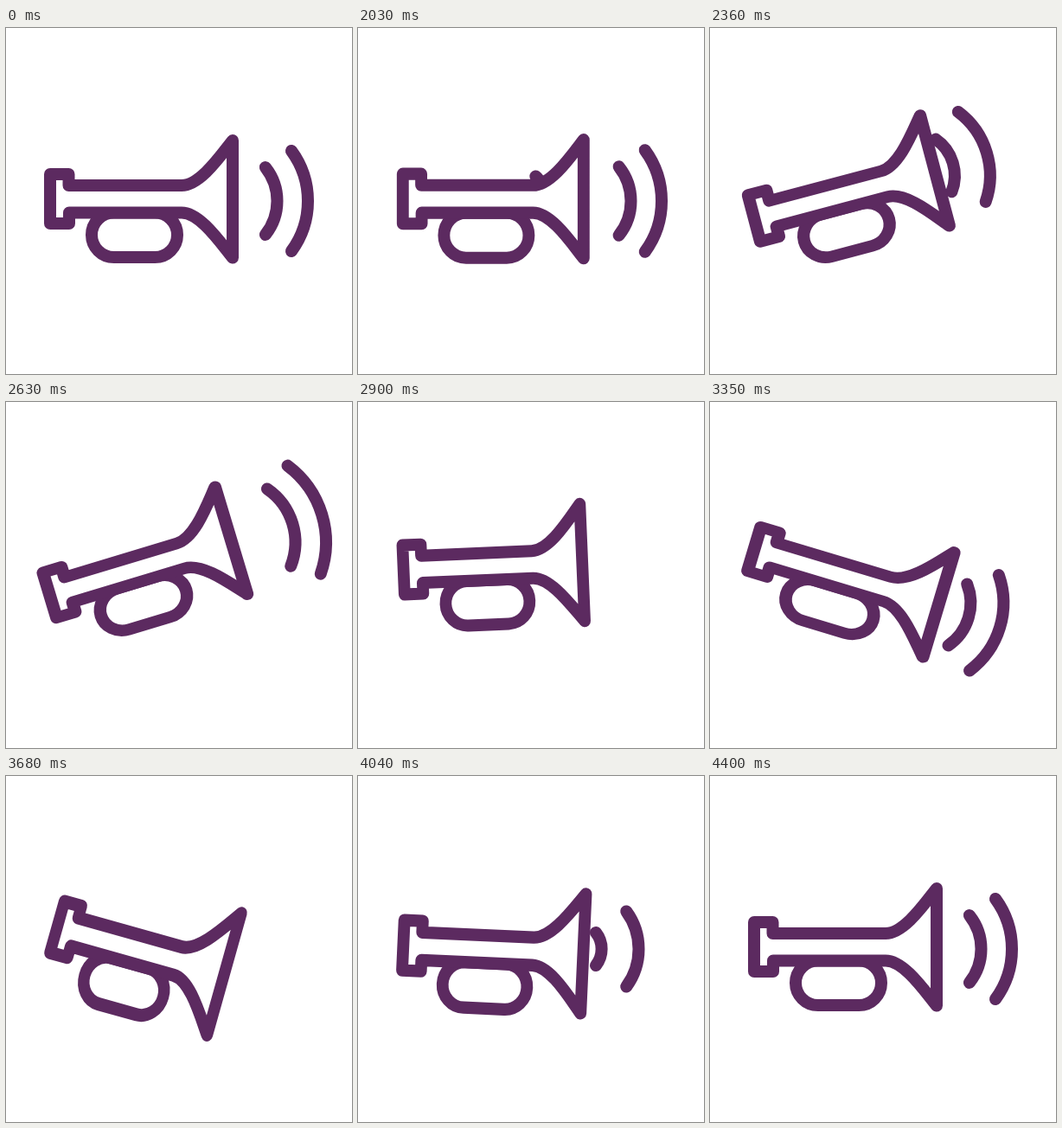
An HTML page that plays this animation: 400x400 px, repeating every 4460 ms.

```html
<!DOCTYPE html>
<html lang="en">
<head>
<meta charset="utf-8">
<title>Bugle</title>
<style>
  html, body { margin: 0; width: 100%; height: 100%; overflow: hidden; background: #fff; }
  svg { display: block; width: 100vw; height: 100vh; }
  path, rect { fill: none; stroke: #5c2a60; stroke-width: 14; stroke-linecap: round; stroke-linejoin: round; }
  .solid { fill: #fff; }
</style>
</head>
<body>
<svg viewBox="0 0 400 400">
  <g id="waves"></g>
  <g id="bugle">
    <rect class="solid" x="99" y="213.5" width="99" height="51.5" rx="25.75"/>
    <path class="solid" d="M72.5 182V169H51V226H73V213.5H203C224 213.5 247 247 262 265.5V130C247 149 224 182 203 182Z"/>
  </g>
</svg>
<script>
const LOOP = 4460, REST = 2000, STEP = 30, LAST = 80;
const PIVOT = { x: 136, y: 201 };

// Tracks of [step, value, ...]
const TILT = [[0, 0], [5, 0], [14, -17], [20, -17], [42, 16.7], [53, 16.7], [73, 0]];
const LIFT = [[22, 0], [30, -7], [40, -2], [50, -2], [68, 2], [78, 0]];
const SQUASH = [
  [0, 1, 1], [5, .91, 1.11], [14, 1.04, .955], [20, 1.04, .955], [30, .98, 1],
  [44, 1.055, .934], [49, 1.055, .934], [55, .95, 1.08], [68, .987, 1.02], [80, 1, 1]
];

// The level blast fills the end of the loop and leaves at its start
const BLASTS = [
  { start: -16, angle: 0 },
  { start: 4, angle: -17 },
  { start: 34, angle: 17 },
  { start: 64, angle: 0 }
];
const ARCS = [
  { from: 0, to: 14, radius: 62.5, spread: 38.5 },
  { from: -4, to: 12, radius: 98, spread: 36.3 }
];
const GONE = 20.5;

const bugle = document.getElementById('bugle');
const waves = document.getElementById('waves');
const clamp = v => Math.min(1, Math.max(0, v));
const rad = deg => deg * Math.PI / 180;
const outQuad = v => 1 - (1 - v) ** 2;

function sample(track, n, col = 1) {
  if (n <= track[0][0]) return track[0][col];
  const i = track.findIndex(k => k[0] >= n);
  if (i < 0) return track[track.length - 1][col];
  const a = track[i - 1], b = track[i], v = (n - a[0]) / (b[0] - a[0]);
  return a[col] + (b[col] - a[col]) * v * v * (3 - 2 * v);
}

for (const blast of BLASTS) {
  blast.paths = ARCS.map(() =>
    waves.appendChild(document.createElementNS('http://www.w3.org/2000/svg', 'path')));
}

function drawBlast({ start, angle, paths }, n) {
  const age = n - start, tilted = angle !== 0;
  const leave = tilted ? clamp((age - 12) / 8) : clamp((age - 16) / 4) ** 2;
  const slide = tilted ? 3.2 * (age - 12.5) : 12 * leave;
  const turn = `translate(${PIVOT.x} ${PIVOT.y}) rotate(${angle}) translate(${115 + slide} -1)`;
  ARCS.forEach((arc, i) => {
    const path = paths[i];
    const grow = clamp((age - arc.from) / (arc.to - arc.from));
    const shown = grow > 0 && age < GONE;
    path.style.display = shown ? '' : 'none';
    if (!shown) return;
    const r = arc.radius * outQuad(grow) + 20 * leave;
    const x = r * Math.cos(rad(arc.spread)), y = r * Math.sin(rad(arc.spread));
    path.setAttribute('d', `M${x} ${-y}A${r} ${r} 0 0 1 ${x} ${y}`);
    path.setAttribute('transform', turn);
    path.style.opacity = clamp((GONE - age) / 3);
  });
}

function draw(t) {
  const n = Math.min(LAST, Math.max(0, Math.floor((t - REST) / STEP)));
  bugle.setAttribute('transform',
    `translate(${PIVOT.x} ${PIVOT.y + sample(LIFT, n)}) rotate(${sample(TILT, n)}) ` +
    `scale(${sample(SQUASH, n)} ${sample(SQUASH, n, 2)}) translate(${-PIVOT.x} ${-PIVOT.y})`);
  BLASTS.forEach(blast => drawBlast(blast, n));
}

const begin = performance.now();
function tick() {
  draw((performance.now() - begin) % LOOP);
  requestAnimationFrame(tick);
}
tick();
</script>
</body>
</html>
```
